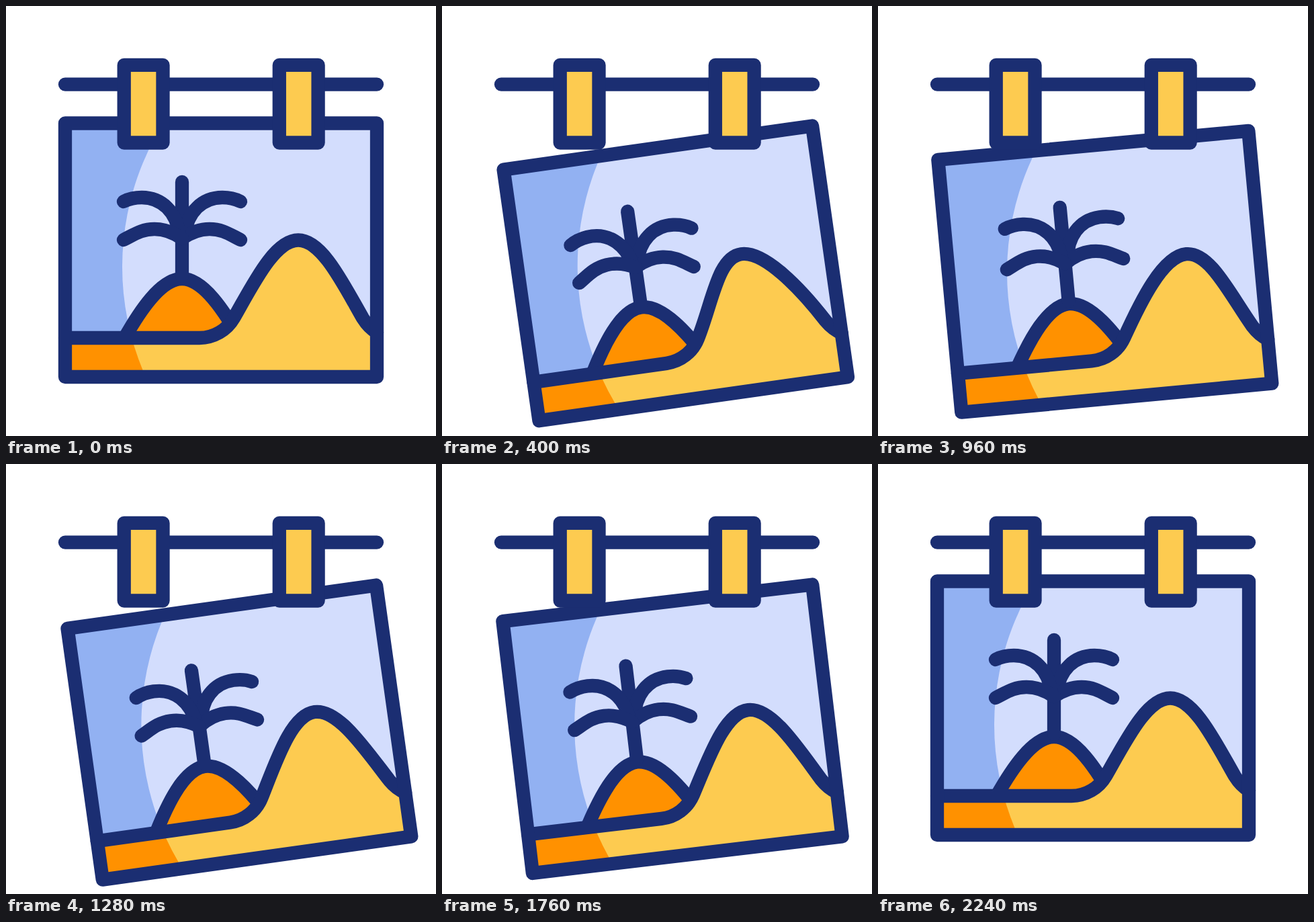
Animation of 640x640 px, one loop 2400 ms. Source, as an HTML page:

```html
<!DOCTYPE html>
<html lang="en">
<head>
<meta charset="utf-8">
<title>Hanging picture</title>
<style>
  html, body { margin: 0; width: 100%; height: 100%; overflow: hidden; background: #fff; }
  svg { display: block; width: 100%; height: 100%; }
  .line { fill: none; stroke: #1b2e72; stroke-width: 20.3; stroke-linecap: round; stroke-linejoin: round; }
  .clip { fill: #fdcb50; }
  .hill { fill: #ff9100; }
</style>
</head>
<body>
<svg viewBox="0 0 640 640">
  <defs>
    <clipPath id="inside"><rect x="88" y="174.5" width="464" height="377.5"/></clipPath>
    <clipPath id="lit"><circle cx="576" cy="388" r="403"/></clipPath>
    <g id="half">
      <path class="line" data-leaf="high" d="M266 340C270 307 292 285 322 285C332 285 341 287 349 291"/>
      <path class="line" data-leaf="low" d="M262 346C275 337 288 332 303 332C322 332 333 340 349 348"/>
    </g>
  </defs>
  <path class="line" d="M88 116.6H552"/>
  <g id="card">
    <g clip-path="url(#inside)">
      <rect x="88" y="174" width="464" height="378" fill="#92b1f2"/>
      <circle cx="576" cy="388" r="403" fill="#d3ddfd"/>
      <path class="line hill" d="M176.5 494C198 456 230 406 262 406S326 456 347.5 494"/>
      <path class="sand" fill="#ff9100"/>
      <path class="sand" fill="#fdcb50" clip-path="url(#lit)"/>
    </g>
    <path class="line" id="ridge"/>
    <path class="line" d="M262 262V402"/>
    <use href="#half"/>
    <use href="#half" transform="translate(524 0) scale(-1 1)"/>
    <rect class="line" x="88" y="174.5" width="464" height="377.5"/>
  </g>
  <rect class="line clip" x="175.7" y="87.9" width="57.8" height="115.6"/>
  <rect class="line clip" x="406.8" y="87.9" width="57.8" height="115.6"/>
</svg>
<script>
const LOOP = 2400, STEP = 40;
const card = document.getElementById('card');
const ridge = document.getElementById('ridge');
const sand = document.querySelectorAll('.sand');
const high = document.querySelector('[data-leaf=high]');
const low = document.querySelector('[data-leaf=low]');

const part = (t, from, to) => Math.min(1, Math.max(0, (t - from) / (to - from)));
const smooth = u => u * u * (3 - 2 * u);

// A sine that dies out between two times.
function wobble(t, from, to, turns) {
  const u = part(t, from, to);
  return (1 - u) * Math.sin(2 * Math.PI * turns * u);
}

function draw(t) {
  // Drop open, bounce back, settle, then return to rest.
  const fall = smooth(part(t, 0, 480) ** 1.3);
  const bounce = smooth(part(t, 480, 810));
  const settle = smooth(part(t, 810, 1320));
  const keep = 1 - smooth(part(t, 1600, 2240));

  const tilt = (9.1 * fall - 4.5 * bounce + 3.42 * settle) * keep;
  const drop = (4.5 * fall + 8.3 * bounce - 6.9 * settle) * keep;
  const shift = -7 * Math.sin(tilt * Math.PI / 180);
  card.setAttribute('transform', `translate(${shift} ${drop}) rotate(${-tilt} 552 174.5)`);

  const lean = -27 * wobble(t, 300, 1280, 1);
  const top = 435 + lean;
  const d = `M88 494H288A59 59 0 0 0 339 464.5C369 412 ${top - 35} 348.5 ${top} 348.5` +
    `S501 412 531 464.5Q540 479 552 486`;
  ridge.setAttribute('d', d);
  sand.forEach(el => el.setAttribute('d', d + 'V552H88Z'));

  high.setAttribute('transform', `rotate(${-0.4 * lean} 262 334)`);
  low.setAttribute('transform', `rotate(${9 * wobble(t, 0, 1280, 0.75)} 262 345)`);
}

let start;
function tick(now) {
  start ??= now;
  const t = Math.max(0, now - start) % LOOP;
  draw(Math.floor(t / STEP + 1e-6) * STEP);
  requestAnimationFrame(tick);
}
draw(0);
requestAnimationFrame(tick);
</script>
</body>
</html>
```
